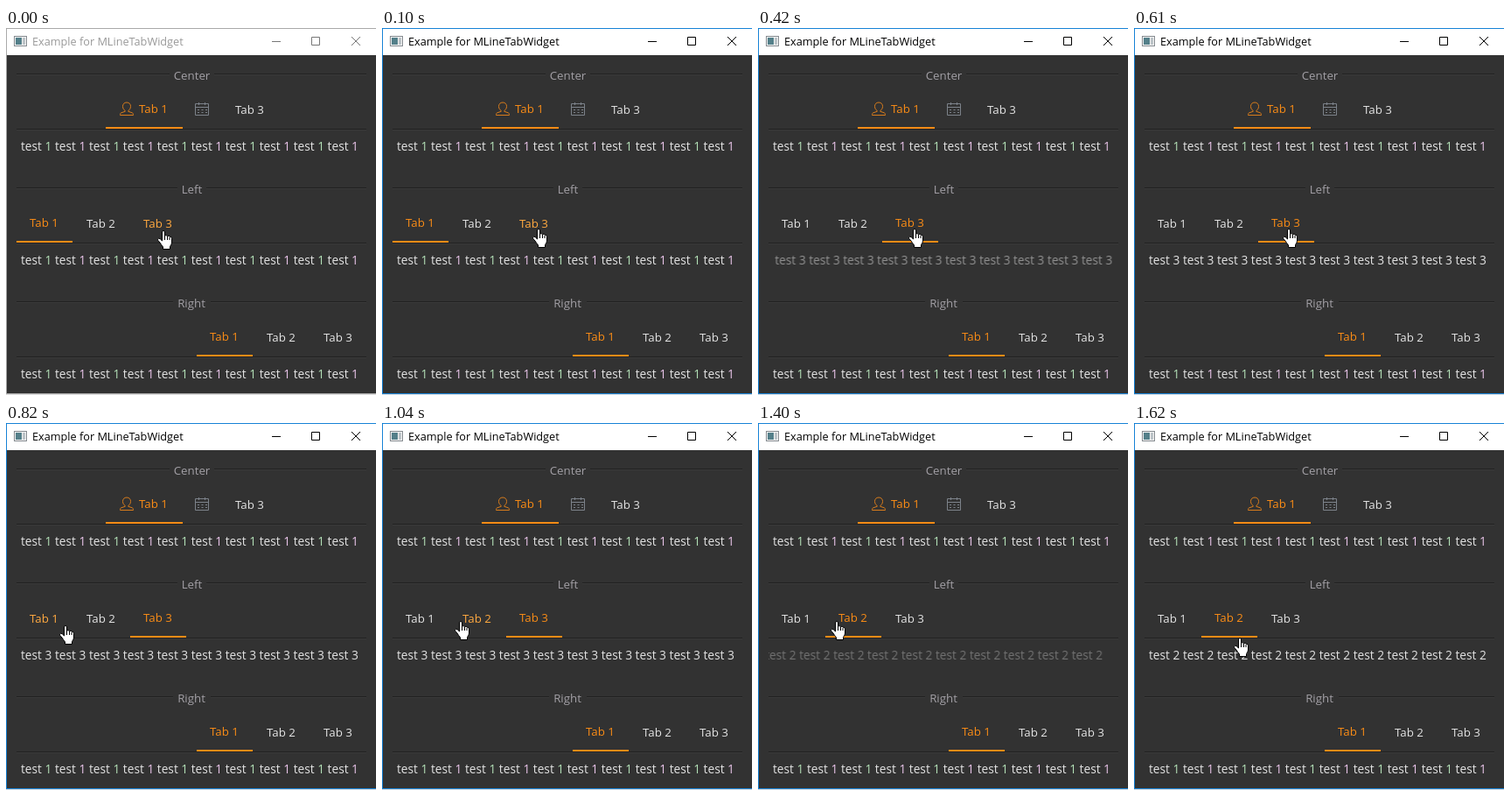
An HTML page for the animation above (1650 ms loop, 423 px wide and 419 px high).

```html
<!DOCTYPE html>
<html lang="en">
<head>
<meta charset="utf-8">
<title>Line tabs</title>
<style>
  html, body { margin: 0; width: 100%; height: 100%; overflow: hidden; background: #323232; }
  svg { display: block; width: 423px; height: 419px; }
  text { font: 13.3px "Open Sans", "Noto Sans", sans-serif; fill: #e4e4e4; }
  .row { font-size: 13.74px; }
  .title { font-size: 12.7px; }
  .label { fill: #a3a0a6; text-anchor: middle; }
  .on { fill: #fa8c16; transform: translateY(-1px); }
  .bar { fill: #fa8c16; }
  .odd { fill: #b4e2b8; }
  .even { fill: #ecc6ec; }
  .rule { fill: #212121; }
  .glow { fill: #3a3a3a; }
  .line { fill: none; stroke-width: 1; }

  /* One shared 1650 ms timeline */
  .anim { animation: 1650ms step-end infinite; }
  .title { animation-name: title; }
  .frame { animation-name: frame; }
  .buttons { animation-name: buttons; }
  .mover { animation-name: bar; }
  .tab1 { animation-name: tab1; }
  .tab2 { animation-name: tab2; }
  .tab3 { animation-name: tab3; }
  .page1 { animation-name: page1; }
  .page2 { animation-name: slide2, fade2; }
  .page3 { animation-name: slide3, fade3; }
  .hand { animation-name: hand; }

  @keyframes title { 0% { fill: #999; } 1.818%, 100% { fill: #000; } }
  @keyframes frame { 0% { fill: #aaa; } 1.818%, 100% { fill: #1883d7; } }
  @keyframes buttons { 0% { stroke: #777; } 1.818%, 100% { stroke: #000; } }
  @keyframes bar {
    0% { transform: none; }
    10.909% { transform: translateX(130px); }
    69.09%, 100% { transform: translateX(65px); }
  }
  @keyframes tab1 {
    0% { fill: #fa8c16; transform: translateY(-1px); }
    10.909% { fill: #e4e4e4; transform: none; }
    47.879% { fill: #ffa940; transform: none; }
    59.394%, 100% { fill: #e4e4e4; transform: none; }
  }
  @keyframes tab2 {
    0% { fill: #e4e4e4; transform: none; }
    42.424% { fill: #ffa940; transform: none; }
    47.879% { fill: #e4e4e4; transform: none; }
    59.394% { fill: #ffa940; transform: none; }
    69.09%, 100% { fill: #fa8c16; transform: translateY(-1px); }
  }
  @keyframes tab3 {
    0% { fill: #ffa940; transform: none; }
    10.909% { fill: #fa8c16; transform: translateY(-1px); }
    69.09%, 100% { fill: #e4e4e4; transform: none; }
  }
  @keyframes page1 { 0% { opacity: 1; } 10.909%, 100% { opacity: 0; } }

  /* Pages slide with ease-out cubic and fade with ease-in cubic */
  @keyframes slide3 {
    0% { transform: translateX(400px); }
    10.606% { transform: translateX(400px); animation-timing-function: cubic-bezier(.3333, 1, .6667, 1); }
    28.788%, 100% { transform: none; }
  }
  @keyframes fade3 {
    0% { opacity: 0; }
    10.606% { opacity: 0; animation-timing-function: cubic-bezier(.3333, 0, .6667, 0); }
    28.788% { opacity: 1; }
    69.09%, 100% { opacity: 0; }
  }
  @keyframes slide2 {
    0% { transform: translateX(-400px); }
    71.818% { transform: translateX(-400px); animation-timing-function: cubic-bezier(.3333, 1, .6667, 1); }
    90%, 100% { transform: none; }
  }
  @keyframes fade2 {
    0% { opacity: 0; }
    71.818% { opacity: 0; animation-timing-function: cubic-bezier(.3333, 0, .6667, 0); }
    90%, 100% { opacity: 1; }
  }
  @keyframes hand {
    0% { transform: translate(173px, 231px); }
    1.818% { transform: translate(172px, 229px); }
    36.97% { transform: translate(170px, 229px); }
    38.788% { transform: translate(160px, 229px); }
    40.606% { transform: translate(143px, 230px); }
    42.424% { transform: translate(122px, 230px); }
    44.242% { transform: translate(102px, 231px); }
    46.061% { transform: translate(84px, 231px); }
    47.879% { transform: translate(69px, 231px); }
    49.697% { transform: translate(61px, 231px); }
    57.576% { transform: translate(65px, 230px); }
    59.394% { transform: translate(72px, 228px); }
    61.212% { transform: translate(79px, 227px); }
    63.03% { transform: translate(83px, 226px); }
    92.727% { transform: translate(88px, 229px); }
    94.545% { transform: translate(98px, 236px); }
    96.364% { transform: translate(108px, 242px); }
    98.182%, 100% { transform: translate(114px, 245px); }
  }
</style>
</head>
<body>
<svg viewBox="0 0 423 419">
  <defs>
    <clipPath id="pane"><rect x="12" y="117" width="400" height="40"/></clipPath>
  </defs>
  <rect width="423" height="419" fill="#323232"/>
  <rect width="423" height="31" fill="#fff"/>

  <!-- Title bar -->
  <rect x="9.5" y="9.5" width="14" height="11" fill="#f4f4f4" stroke="#858b90"/>
  <rect x="11" y="11" width="7" height="8" fill="#54808a"/>
  <rect x="19" y="11" width="3" height="8" fill="#bcc4c8"/>
  <text class="anim title" x="30" y="20">Example for MLineTabWidget</text>
  <path class="anim buttons line" d="M304 15.5h10M349.5 10.5h9v9h-9zM395 10l10 10M405 10l-10 10"/>

  <!-- Center -->
  <g>
    <g class="rules" data-gap="25"></g>
    <text class="label" x="212.5" y="59">Center</text>
    <path class="line" stroke="#d87c1c"
      d="M138 85c-2.800 0-4.500 1.900-4.500 4.400 0 2.200 1.100 4.100 2.700 5v.9l-4.500 1.500c-.9.4-1.200 1.100-1.200 2.700h15c0-1.600-.3-2.300-1.200-2.700l-4.500-1.500v-.9c1.600-.9 2.700-2.800 2.700-5 0-2.500-1.700-4.400-4.500-4.400z"/>
    <g class="line" stroke="#7c828a">
      <path d="M216.500 86.500h15v13h-15zM216.500 90.500h15M220.500 85v3M227.500 85v3"/>
      <path d="M219 93.500h11M219 96.500h11" stroke-dasharray="2 2.500"/>
    </g>
    <text class="on" x="152" y="98">Tab 1</text>
    <text x="262" y="98">Tab 3</text>
    <rect class="bar" x="114" y="113" width="88" height="2"/>
    <text class="row" data-n="1" x="17" y="140"></text>
  </g>

  <!-- Left -->
  <g transform="translate(0 130)">
    <g class="rules" data-gap="16"></g>
    <text class="label" x="212.5" y="59">Left</text>
    <text class="anim tab1" x="27" y="98">Tab 1</text>
    <text class="anim tab2" x="92" y="98">Tab 2</text>
    <text class="anim tab3" x="157" y="98">Tab 3</text>
    <rect class="anim mover bar" x="12" y="113" width="64" height="2"/>
    <g clip-path="url(#pane)">
      <text class="row anim page1" data-n="1" x="17" y="140"></text>
      <text class="row anim page2" data-n="2" x="17" y="140"></text>
      <text class="row anim page3" data-n="3" x="17" y="140"></text>
    </g>
  </g>

  <!-- Right -->
  <g transform="translate(0 260)">
    <g class="rules" data-gap="21"></g>
    <text class="label" x="212" y="59">Right</text>
    <text class="on" x="233" y="98">Tab 1</text>
    <text x="298" y="98">Tab 2</text>
    <text x="363" y="98">Tab 3</text>
    <rect class="bar" x="218" y="113" width="64" height="2"/>
    <text class="row" data-n="1" x="17" y="140"></text>
  </g>

  <!-- Window border -->
  <path class="anim frame" d="M0 0h423v1H1v416h422v1H0z"/>
  <rect y="418" width="423" height="1" fill="#dcdcdc"/>

  <!-- Pointer -->
  <g class="anim hand" stroke="#000" stroke-linejoin="round">
    <path fill="#fff"
      d="M5.500 12V2a1.500 1.500 0 0 1 3 0V6q1.500-1 3 .5 1.600-.7 2.700.7 2.300-.3 2.300 2v4.800q0 2-2 4.500V21.500H6.500V19Q4.500 16.500 3 14L.8 11.500q-.8-1.600.7-2.200 1.500-.4 4 2.700z"/>
    <path class="line" d="M8.500 6v5M11.500 7v4M14 8v3"/>
  </g>
</svg>
<script>
  const rect = (cls, x, y, w) => `<rect class="${cls}" x="${x}" y="${y}" width="${w}" height="1"/>`;
  const groove = (x, y, w) => rect("rule", x, y, w) + rect("glow", x, y + 1, w);

  // Split rule around the label, plus the full rule under the tabs
  for (const g of document.querySelectorAll(".rules")) {
    const gap = +g.dataset.gap;
    g.innerHTML = groove(12, 52, 200 - gap) + groove(213 + gap, 52, 199 - gap) + groove(12, 115, 400);
  }

  for (const row of document.querySelectorAll(".row")) {
    const n = row.dataset.n;
    const word = i => n === "1" ? `test <tspan class="${i % 2 ? "even" : "odd"}">1</tspan>` : `test ${n}`;
    row.innerHTML = Array.from({ length: 10 }, (_, i) => word(i)).join(" ");
  }
</script>
</body>
</html>
```
